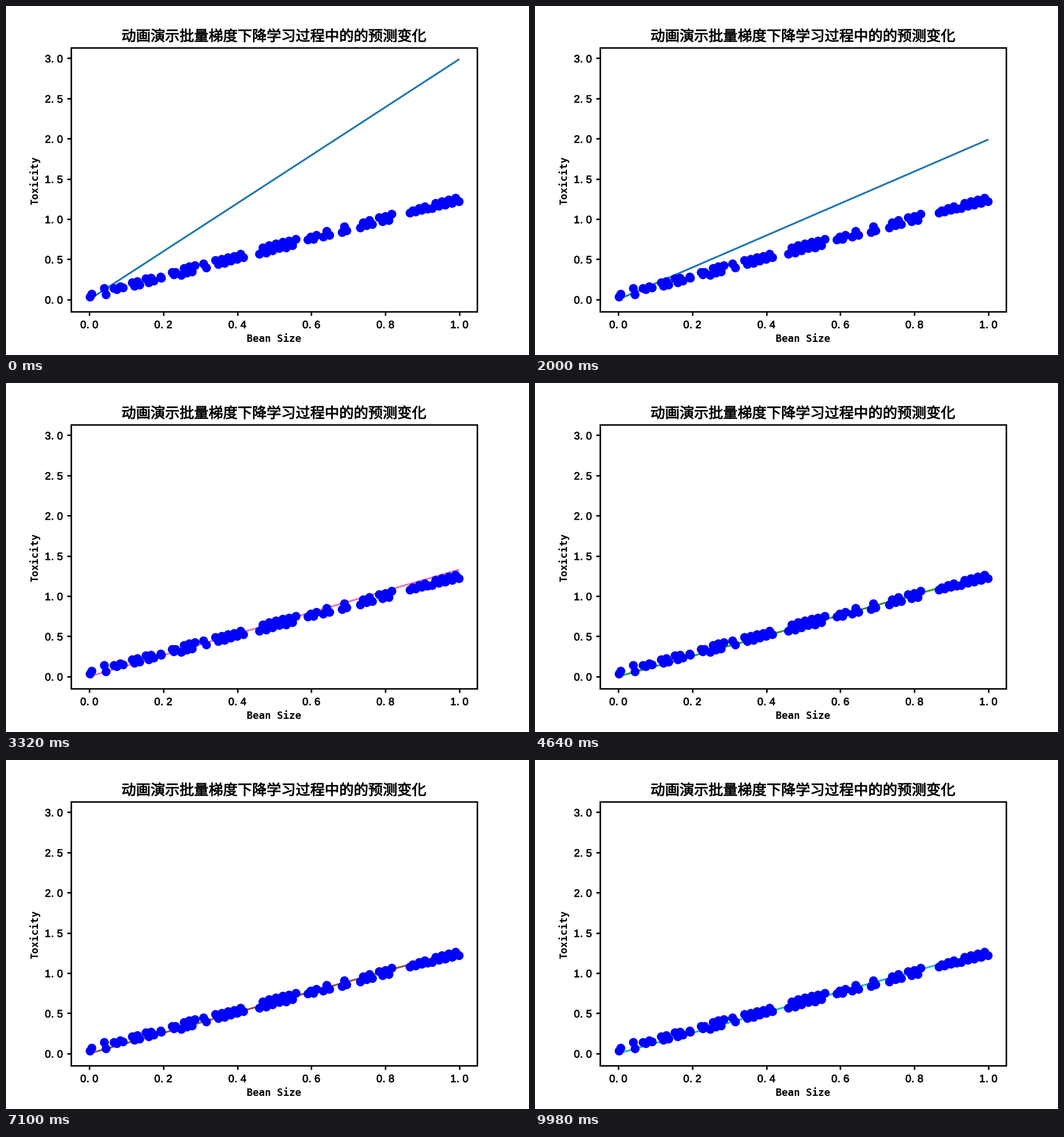
Recreate the animation shown at these times as a matplotlib script. Size 917x611 px, loop 10 s.

```python
import numpy as np
import matplotlib.pyplot as plt
from matplotlib.animation import FuncAnimation
from matplotlib.patches import PathPatch, Rectangle
from matplotlib.path import Path
from matplotlib.textpath import TextPath

W, H, DPI = 917, 611, 128
FRAMES, INTERVAL = 500, 20

# Plot box and data origin, in stage pixels
LEFT, RIGHT, TOP, BOTTOM = 114.4, 825.6, 73.0, 534.8
X0, Y0, X_UNIT, Y_UNIT = 146.0, 513.8, 649.0, 140.77
CELL, TICK, STROKE = 10.6, 7.4, 2.6

# Runs of beans: first x, last x, swing about the trend
RUNS = [
    (147, 150, 2), (172, 175, -7), (189, 205, -2), (221, 234, -4),
    (245, 259, -4), (271, 272, -1), (291, 297, -2), (307, 331, 5),
    (346, 351, -5), (367, 416, -4), (444, 508, 5), (529, 544, 3),
    (556, 567, 4), (589, 597, 4), (621, 642, 4), (654, 676, -4),
    (708, 739, 2), (747, 793.5, 4),
]


def pt(px):
    return px * 72 / DPI


def to_x(v):
    return X0 + X_UNIT * v


def to_y(v):
    return Y0 - Y_UNIT * v


def scatter_beans():
    """Beans about 6 px apart, alternating around y = 1.2 x + 0.05."""
    rng = np.random.default_rng(4)
    xs, ys = [], []
    for first, last, swing in RUNS:
        n = 2 + int(last - first) // 6
        x = np.linspace(first, last, n)
        sway = swing * (-1.0) ** np.arange(n) + rng.uniform(-1, 1, n)
        xs.append(x)
        ys.append(to_y(1.2 * (x - X0) / X_UNIT + 0.05) + sway)
    return np.concatenate(xs), np.concatenate(ys)


def outline(text, size, family):
    path = TextPath((0, 0), text, size=size, prop={"family": family})
    return Path(path.vertices * (1, -1), path.codes)


def moved(path, dx, dy):
    return Path(path.vertices + (dx, dy), path.codes)


def cells(text, cx, cy):
    """Digits on an even half-width grid, the point left in its cell."""
    paths = []
    for i, ch in enumerate(text):
        glyph = outline(ch, 18.6, "Liberation Sans")
        box = glyph.get_extents()
        x = cx + (i - (len(text) - 1) / 2) * CELL - (box.x0 + box.x1) / 2
        paths.append(moved(glyph, x - 2.5 * (ch == "."), cy + 6.7))
    return paths


fig = plt.figure(figsize=(W / DPI, H / DPI), dpi=DPI, facecolor="white")
ax = fig.add_axes([0, 0, 1, 1])
ax.set(xlim=(0, W), ylim=(H, 0))
ax.axis("off")


def ink(path, stroke):
    ax.add_patch(PathPatch(path, fc="black", ec="black", lw=pt(stroke)))


# Frame, ticks and tick labels
ax.add_patch(Rectangle((LEFT, TOP), RIGHT - LEFT, BOTTOM - TOP, fill=False,
                       ec="black", lw=pt(STROKE), zorder=4))
tick_x, tick_y, labels = [], [], []
for v in np.arange(0, 1.01, 0.2):
    x = to_x(v)
    tick_x += [x, x, np.nan]
    tick_y += [BOTTOM, BOTTOM + TICK, np.nan]
    labels += cells(f"{v:.1f}", x, 557.3)
for v in np.arange(0, 3.01, 0.5):
    y = to_y(v)
    tick_x += [LEFT - TICK, LEFT, np.nan]
    tick_y += [y, y, np.nan]
    labels += cells(f"{v:.1f}", 84, y + 0.5)
ax.plot(tick_x, tick_y, color="black", lw=pt(STROKE), snap=True,
        solid_capstyle="butt", zorder=4)
ink(Path.make_compound_path(*labels), 0.8)

# Title and axis names
title = outline("动画演示批量梯度下降学习过程中的的预测变化", 25.45,
                "Noto Sans CJK JP")
box = title.get_extents()
ink(moved(title, 470 - (box.x0 + box.x1) / 2, 51.3 - (box.y0 + box.y1) / 2),
    0.9)
name = dict(family="DejaVu Sans Mono", weight="bold", ha="center",
            va="baseline", fontsize=pt(CELL / 0.602))
ax.text(469.5, 588.5, "Bean Size", **name)
ax.text(56.5, 306, "Toxicity", rotation=90, rotation_mode="anchor", **name)

ax.scatter(*scatter_beans(), s=pt(15.6) ** 2, c="blue", linewidths=0, zorder=3)

ends = np.array([147.0, 793.5])
line, = ax.plot(ends, ends, lw=pt(3.18), zorder=2)


def draw(i):
    # Fixed-size steps down, then hopping around the optimum
    w = max(2.99 - 0.01 * i, 1.27 + 0.01 * (i % 2))
    line.set_ydata(to_y(w * (ends - X0) / X_UNIT))
    line.set_color(f"C{i % 10}")
    return line,


anim = FuncAnimation(fig, draw, frames=FRAMES, interval=INTERVAL, repeat=True,
                     repeat_delay=0, blit=False)
plt.show()
```
